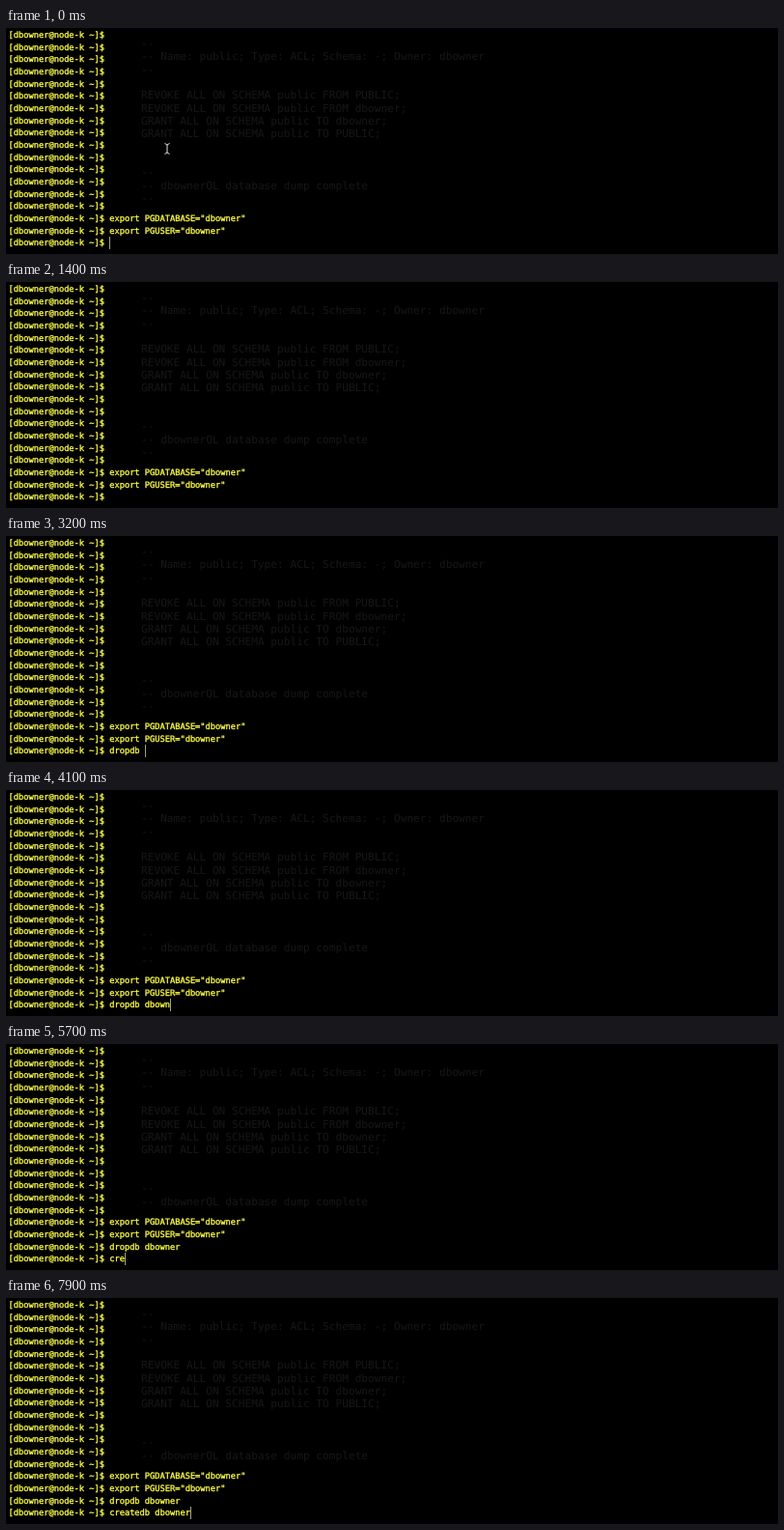
An HTML page with a canvas for the animation above (8000 ms loop, 800x234 px).

```html
<!DOCTYPE html>
<html lang="en">
<head>
<meta charset="utf-8">
<title>Terminal session</title>
<style>
  html, body { margin: 0; width: 100%; height: 100%; overflow: hidden; background: #000; }
  canvas { display: block; }
</style>
</head>
<body>
<canvas id="stage" width="800" height="234"></canvas>
<script>
const ctx = document.getElementById("stage").getContext("2d");
const LOOP = 8000;
const MONO = '"DejaVu Sans Mono", monospace';
const USER = "dbowner";
const PROMPT = `[${USER}@node-k ~]$ `;
const ROWS = 18;

const shell = { x: 2.6, y: 9.9, pitch: 12.68, cell: 5.24, font: `8.704px ${MONO}`, color: "#fafa46", weight: 0.35 };
const ghost = { x: 140, y: 19.8, pitch: 13.35, font: `11.16px ${MONO}`, color: "#171717", weight: 0 };

const ghostLines = [
  "--",
  `-- Name: public; Type: ACL; Schema: -; Owner: ${USER}`,
  "--",
  "",
  "REVOKE ALL ON SCHEMA public FROM PUBLIC;",
  `REVOKE ALL ON SCHEMA public FROM ${USER};`,
  `GRANT ALL ON SCHEMA public TO ${USER};`,
  "GRANT ALL ON SCHEMA public TO PUBLIC;",
  "",
  "",
  "--",
  `-- ${USER}QL database dump complete`,
  "--"
];

const history = [`export PGDATABASE="${USER}"`, `export PGUSER="${USER}"`];

// Key press times in ms, one per character
const drop = {
  text: `dropdb ${USER}`,
  keys: [1900, 2100, 2300, 2400, 2600, 2800, 3000, 3400, 3600, 3700, 3900, 4000, 4200, 4300]
};
const create = {
  text: `createdb ${USER}`,
  keys: [5300, 5500, 5700, 5800, 5900, 6100, 6200, 6300, 6500, 6700, 6900, 7100, 7200, 7400, 7500, 7700]
};
const ENTER = 4600, READY = 4900, HIDE = 1300, SHOW = 1700;

const typed = (cmd, t) => cmd.text.slice(0, cmd.keys.filter(k => k <= t).length);

function drawLines(lines, style) {
  ctx.font = style.font;
  ctx.fillStyle = ctx.strokeStyle = style.color;
  lines.forEach((line, i) => {
    const y = style.y + i * style.pitch;
    ctx.fillText(line, style.x, y);
    if (style.weight) {
      ctx.lineWidth = style.weight;
      ctx.strokeText(line, style.x, y);
    }
  });
}

function screenRows(t) {
  const entered = t >= ENTER;
  const commands = entered ? [...history, drop.text] : history;
  const blanks = Array(ROWS - 1 - commands.length).fill("");
  const rows = [...blanks, ...commands].map(c => PROMPT + c);
  if (!entered) rows.push(PROMPT + typed(drop, t));
  else rows.push(t < READY ? "" : PROMPT + typed(create, t));
  return rows;
}

function drawCaret(column) {
  ctx.fillStyle = "#a4a478";
  ctx.fillRect(Math.floor(shell.x + column * shell.cell), 216, 1, 13);
}

function drawPointer(x, y) {
  ctx.strokeStyle = "#e4e4e4";
  ctx.lineWidth = 1;
  ctx.beginPath();
  ctx.moveTo(x, y - 4);
  ctx.lineTo(x, y + 4);
  for (const s of [-1, 1]) {
    ctx.moveTo(x - 2.5, y + s * 5.5);
    ctx.lineTo(x, y + s * 4);
    ctx.lineTo(x + 2.5, y + s * 5.5);
  }
  ctx.stroke();
}

function draw(t) {
  ctx.fillStyle = "#000";
  ctx.fillRect(0, 0, 800, 234);
  ctx.textRendering = "geometricPrecision";
  ctx.lineJoin = "round";

  // Scrolling wipes the last leftover line
  drawLines(t < ENTER ? ghostLines : ghostLines.slice(0, -1), ghost);
  const rows = screenRows(t);
  drawLines(rows, shell);

  if (t < HIDE) drawPointer(167, 125);
  if (t < HIDE || t >= SHOW) drawCaret(rows[ROWS - 1].length);
}

const start = performance.now();
function tick() {
  draw((performance.now() - start) % LOOP);
  requestAnimationFrame(tick);
}
tick();
</script>
</body>
</html>
```
